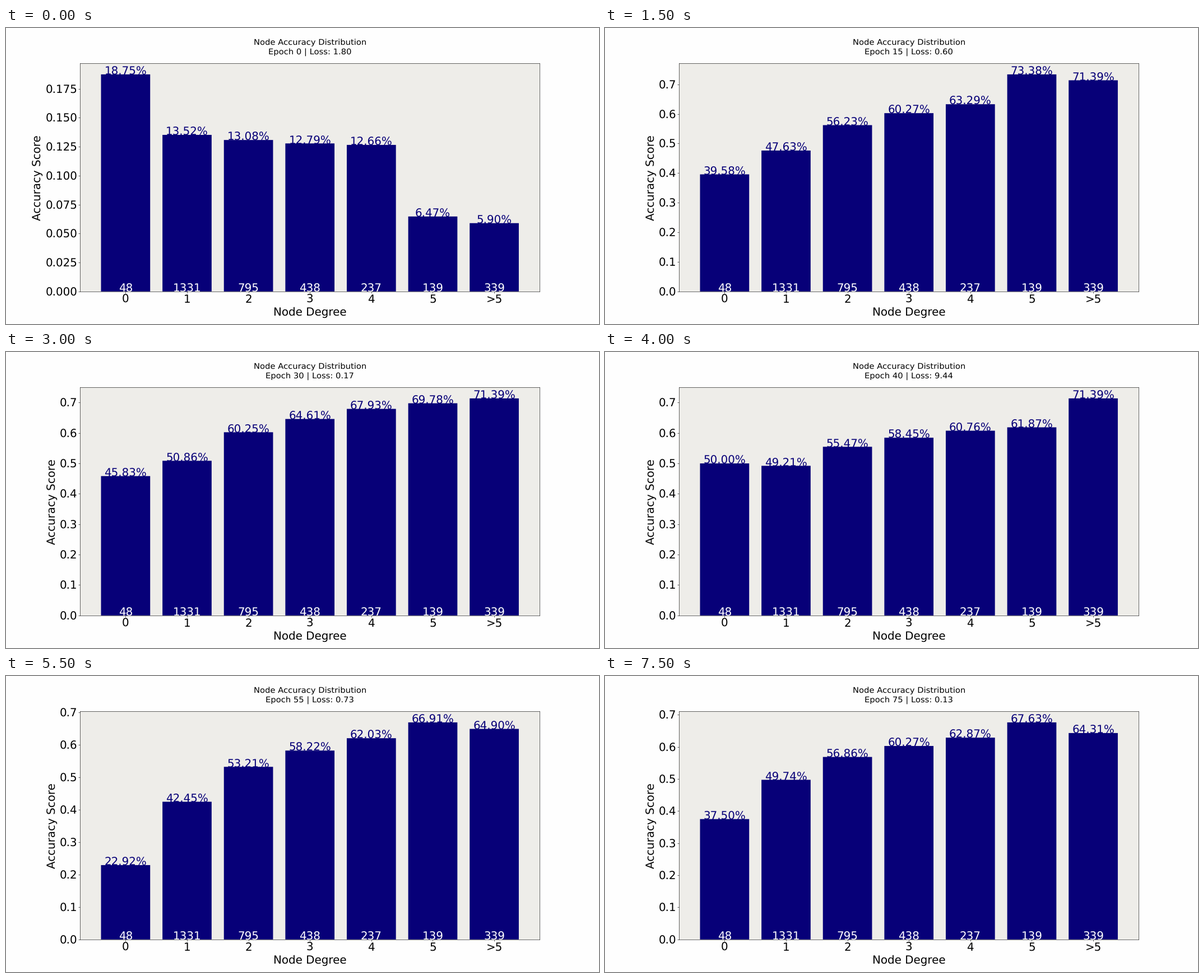
These frames come from a looping animation (1058 px wide and 529 px high, 8000 ms). A matplotlib script:

```python
import numpy as np
import matplotlib.pyplot as plt
from matplotlib.animation import FuncAnimation

plt.rcParams.update({"font.family": "DejaVu Sans", "text.hinting": "none"})

BAR, PLOT_BG, PAGE_BG = "#070078", "#eeede9", "#fefefe"
BIG, SMALL = 27, 20
STEP = 5     # epochs per frame
EASE = 0.35  # learning is fast at first, then levels off

DEGREES = ["0", "1", "2", "3", "4", "5", ">5"]
TOTALS = np.array([48, 1331, 795, 438, 237, 139, 339])

# Key points of training: loss, and correctly classified nodes by bar
EPOCHS = np.array([0, 15, 30, 40, 55, 65, 75])
LOSS = [1.80, 0.60, 0.17, 9.44, 0.73, 0.16, 0.13]
HITS = {
    0: [9, 19, 22, 24, 11, 19, 18],
    1: [180, 634, 677, 655, 565, 612, 662],
    4: [30, 150, 161, 144, 147, 149, 149],
    5: [9, 102, 97, 86, 93, 84, 94],
    6: [20, 242, 242, 242, 220, 204, 218],
}


def track(epoch, values):
    return np.interp(epoch ** EASE, EPOCHS ** EASE, values)


def state(epoch):
    """Loss and accuracy of every bar at an epoch."""
    loss = np.exp(track(epoch, np.log(LOSS)))
    accuracy = np.zeros(len(TOTALS))
    for i, hits in HITS.items():
        accuracy[i] = track(epoch, hits) / TOTALS[i]
    # bars 2 and 3 follow a flattening curve from bar 1 to bar 4
    low, high = accuracy[1], accuracy[4]
    accuracy[2:4] = low + (high - low) * (np.array([1, 2]) / 3) ** 0.55
    return loss, np.rint(accuracy * TOTALS) / TOTALS


def label(x, text, color):
    return ax.annotate(text, (x, 0), xytext=(0, -1.3), textcoords="offset points",
                       color=color, fontsize=BIG, ha="center", annotation_clip=False)


fig, ax = plt.subplots(figsize=(20, 10), dpi=52.9, facecolor=PAGE_BG)
ax.set_facecolor(PLOT_BG)
ax.tick_params(labelsize=BIG)
ax.set_xlabel("Node Degree", fontsize=BIG)
ax.set_ylabel("Accuracy Score", fontsize=BIG)
title = ax.set_title("", fontsize=SMALL, pad=22, linespacing=1.3)

bars = ax.bar(DEGREES, np.ones(len(DEGREES)), color=BAR, snap=False)
scores = [label(i, "", BAR) for i in range(len(DEGREES))]
for i, total in enumerate(TOTALS):
    label(i, str(total), "white")


def update(frame):
    epoch = frame * STEP
    loss, accuracy = state(epoch)
    title.set_text(f"Node Accuracy Distribution\nEpoch {epoch} | Loss: {loss:.2f}")
    for i, value in enumerate(accuracy):
        bars[i].set_height(value)
        scores[i].xy = (i, value)
        scores[i].set_text(f"{value:.2%}")
    ax.set_ylim(0, accuracy.max() * 1.05)
    return [title, *bars, *scores]


anim = FuncAnimation(fig, update, frames=16, init_func=lambda: update(0),
                     interval=500, repeat=True, repeat_delay=0, blit=False)
plt.show()
```
